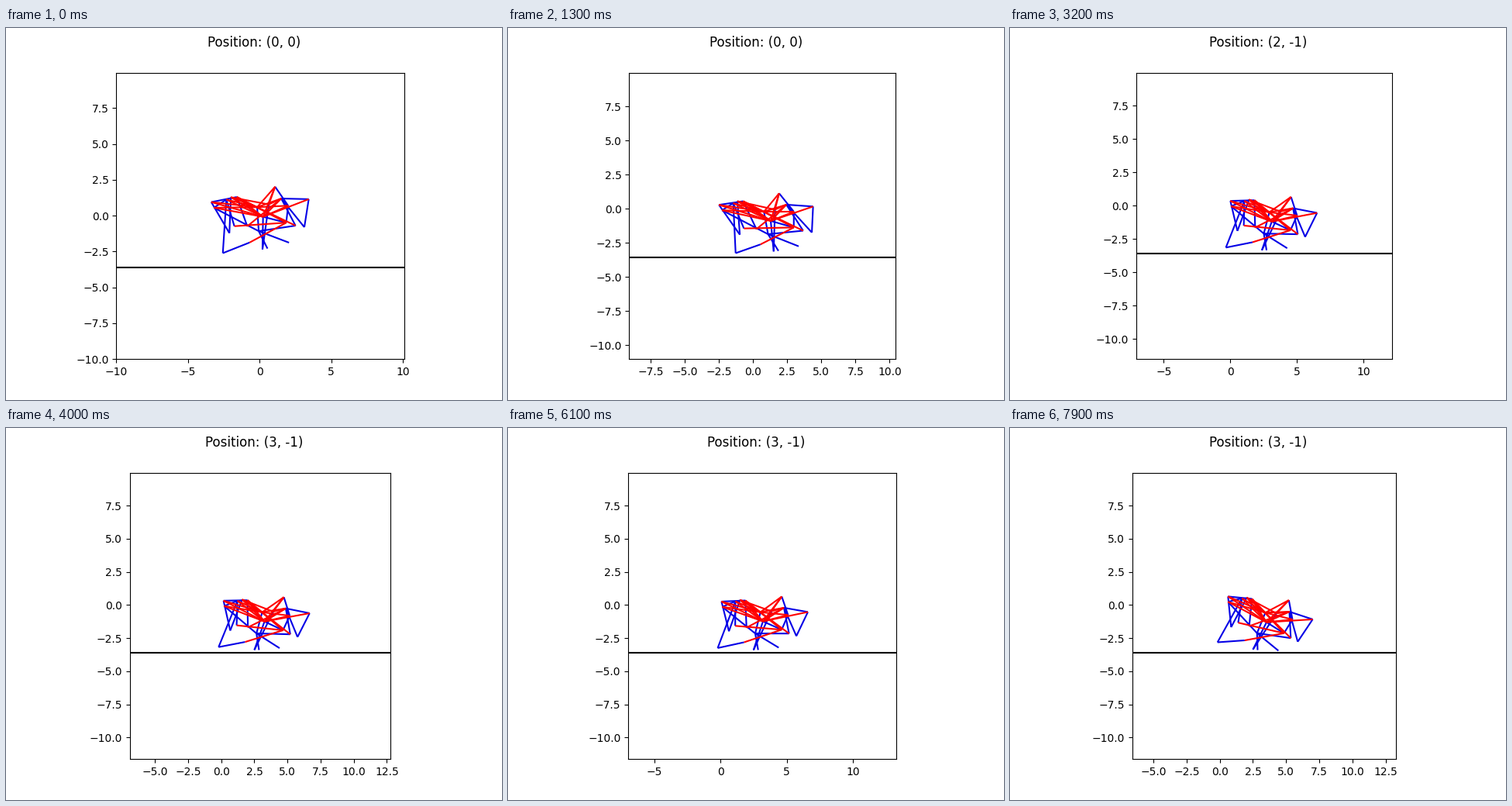
These frames come from a looping animation (640 px wide and 480 px high, 8 s). A matplotlib script:

```python
from itertools import product

import numpy as np
import matplotlib.pyplot as plt
from matplotlib.animation import FuncAnimation
from matplotlib.collections import LineCollection

FRAMES, STEP = 80, .1
GROUND, SETTLED = -3.6, 3.3
FOOT = 2.8 - 3.4j
BLUE = (.02, 0, .9)

# The creature at rest, one letter per joint.
JOINTS = dict(
    a=.15 + .3j, b=.2 - .1j, x=1.2 + .3j, h=1.55 + .4j, i=1.95 + .35j,
    c=.67 - 1.95j, d=-.2 - 3.2j, e=1.8 - 2.8j, f=1.15 - 1.55j, j=2 - 1.7j,
    k=2.5 - 3.4j, l=2.85 - 3.4j, m=4.4 - 3.25j, n=2.65 - 2.15j,
    o=5.2 - 2.2j, p=5.15 - .8j, q=4.7 + .6j, r=4.85 - .25j,
    s=6.65 - .6j, t=5.75 - 2.4j, u=4.65 - 1.9j, v=3.9 - .5j,
    w=3.07 - .55j, z=3.25 - 1.25j)
INDEX = {name: i for i, name in enumerate(JOINTS)}
REST = np.array(list(JOINTS.values()))


def links(paths):
    """Joint pairs along each path of letters."""
    return [(INDEX[p], INDEX[q]) for path in paths for p, q in zip(path, path[1:])]


MUSCLES = links("iach bx bn xde fx ij kv ln mno orstr pu qp nw uz kz".split())
BONES = links(product("abxhiqrp", "wz"))
BONES += links("sz fu eu wo jr iu hv vr vq".split())

# Settling in: shift, lift, lean and roll relative to the rest pose.
KEY_T = [0, 1.3, 2.5, SETTLED]
SHIFT = [-2.3, -1, -1.05, 0]
LIFT = [1.1, .3, .45, 0]
LEAN = [.33, .45, .03, 0]
ROLL = [.17, .12, 0, 0]


def mean_x(t):
    if t < SETTLED:
        return np.interp(t, KEY_T, [0, .9, 1.87, 3.11])
    centre = 3.28 - .028 * (t - 3.6)
    return centre + .24 * np.cos(2 * np.pi * (t - 5.05) / 2.85)


def right(t):
    return 10 + 3.3 / (1 + np.exp((2.75 - t) / .75))


def bottom(t):
    return np.interp(t, [0, .8, 2.8, SETTLED], [-10, -11.03, -11.03, -11.63])


def body(t):
    shift, lift, lean, roll = (np.interp(t, KEY_T, v)
                               for v in (SHIFT, LIFT, LEAN, ROLL))
    if t >= SETTLED:  # rocking on its feet
        lean = roll = -.41 * (mean_x(t) - 3.09)
    arm = REST - FOOT
    dx = shift - lean * arm.imag
    dy = lift + roll * arm.real
    return np.column_stack([REST.real + dx, REST.imag + dy])


fig, ax = plt.subplots(figsize=(6.4, 4.8), dpi=100)
ax.set_aspect("equal", adjustable="box")
ax.axhline(GROUND, color="black", lw=1.5)
title = fig.suptitle("")
muscles = LineCollection([], colors=[BLUE], linewidths=1.5, zorder=3)
bones = LineCollection([], colors="red", linewidths=1.5, zorder=4)
for group in (muscles, bones):
    ax.add_collection(group, autolim=False)


def draw(i):
    t = i * STEP
    p = body(t)
    x = mean_x(t)
    muscles.set_segments(p[np.array(MUSCLES)])
    bones.set_segments(p[np.array(BONES)])
    ax.set_xlim(x - 10, right(t))
    ax.set_ylim(bottom(t), 9.98)
    title.set_text(f"Position: ({int(x)}, {-1 if t >= 3 else 0})")
    return muscles, bones, title


anim = FuncAnimation(fig, draw, frames=FRAMES, interval=STEP * 1000,
                     repeat=True, repeat_delay=0, blit=False)
plt.show()
```
